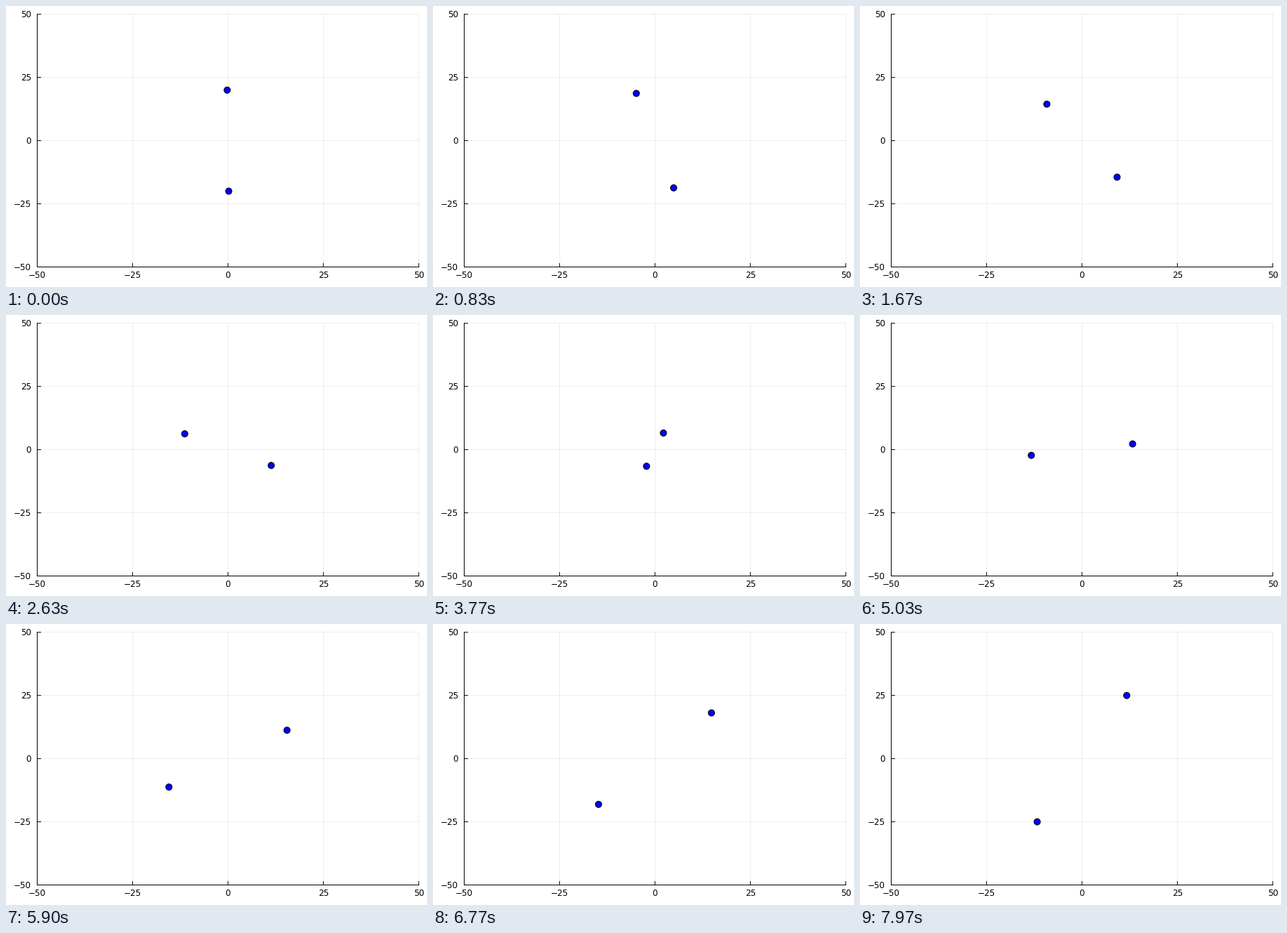
Animation, 600 px wide and 400 px high, one loop 8 s. Source, as a matplotlib script:

```python
import numpy as np
import matplotlib.pyplot as plt
from matplotlib.animation import FuncAnimation
from matplotlib.patches import Circle

W, H, DPI = 600, 400, 100
PX = 72 / DPI                       # one pixel in points
LEFT, RIGHT, TOP, BOTTOM = 44.5, 588.2, 11.8, 371.5
FRAMES, LOOP = 240, 8000
G = 6.67


def orbit(steps):
    """Unit time steps of one of two equal, mirrored bodies."""
    pos, vel = np.array([0.0, 20.0]), np.array([-0.2, 0.0])
    path = []
    for _ in range(steps):
        gap = 2 * pos
        acc = -G * gap / np.hypot(*gap) ** 3
        pos = pos + vel + acc / 2
        vel = vel + acc
        path.append(pos)
    return path


def to_px(x, y):
    return (LEFT + (x + 50) / 100 * (RIGHT - LEFT),
            BOTTOM - (y + 50) / 100 * (BOTTOM - TOP))


plt.rcParams["font.family"] = "DejaVu Sans"
fig = plt.figure(figsize=(W / DPI, H / DPI), dpi=DPI, facecolor="white")
ax = fig.add_axes([0, 0, 1, 1])
ax.set(xlim=(0, W), ylim=(H, 0))
ax.axis("off")


def line(x0, y0, x1, y1, **style):
    ax.plot([x0, x1], [y0, y1], snap=False, **style)


GRID = dict(color="black", alpha=0.1, lw=0.7 * PX, zorder=1)
AXIS = dict(color="black", lw=PX, zorder=2)

for v in range(-50, 51, 25):
    x, y = to_px(v, v)
    label = str(v).replace("-", "\u2212")
    line(x, TOP, x, BOTTOM, **GRID)
    line(LEFT, y, RIGHT, y, **GRID)
    line(x, BOTTOM, x, BOTTOM - 5, **AXIS)
    line(LEFT, y, LEFT + 5, y, **AXIS)
    ax.text(x, BOTTOM + 5.6, label, size=12 * PX, ha="center", va="top")
    ax.text(LEFT - 8.5, y - 0.9, label, size=12 * PX, ha="right",
            va="center_baseline")
line(LEFT, BOTTOM, RIGHT, BOTTOM, **AXIS)
line(LEFT, TOP, LEFT, BOTTOM, **AXIS)

path = orbit(FRAMES)
dots = [ax.add_patch(Circle((0, 0), 4.5, fc="blue", ec="black", lw=PX, zorder=3))
        for _ in range(2)]


def draw(i):
    for dot, sign in zip(dots, (1, -1)):
        dot.center = to_px(*(sign * path[i]))
    return dots


anim = FuncAnimation(fig, draw, frames=FRAMES, interval=LOOP / FRAMES,
                     repeat=True, repeat_delay=0)
plt.show()
```
